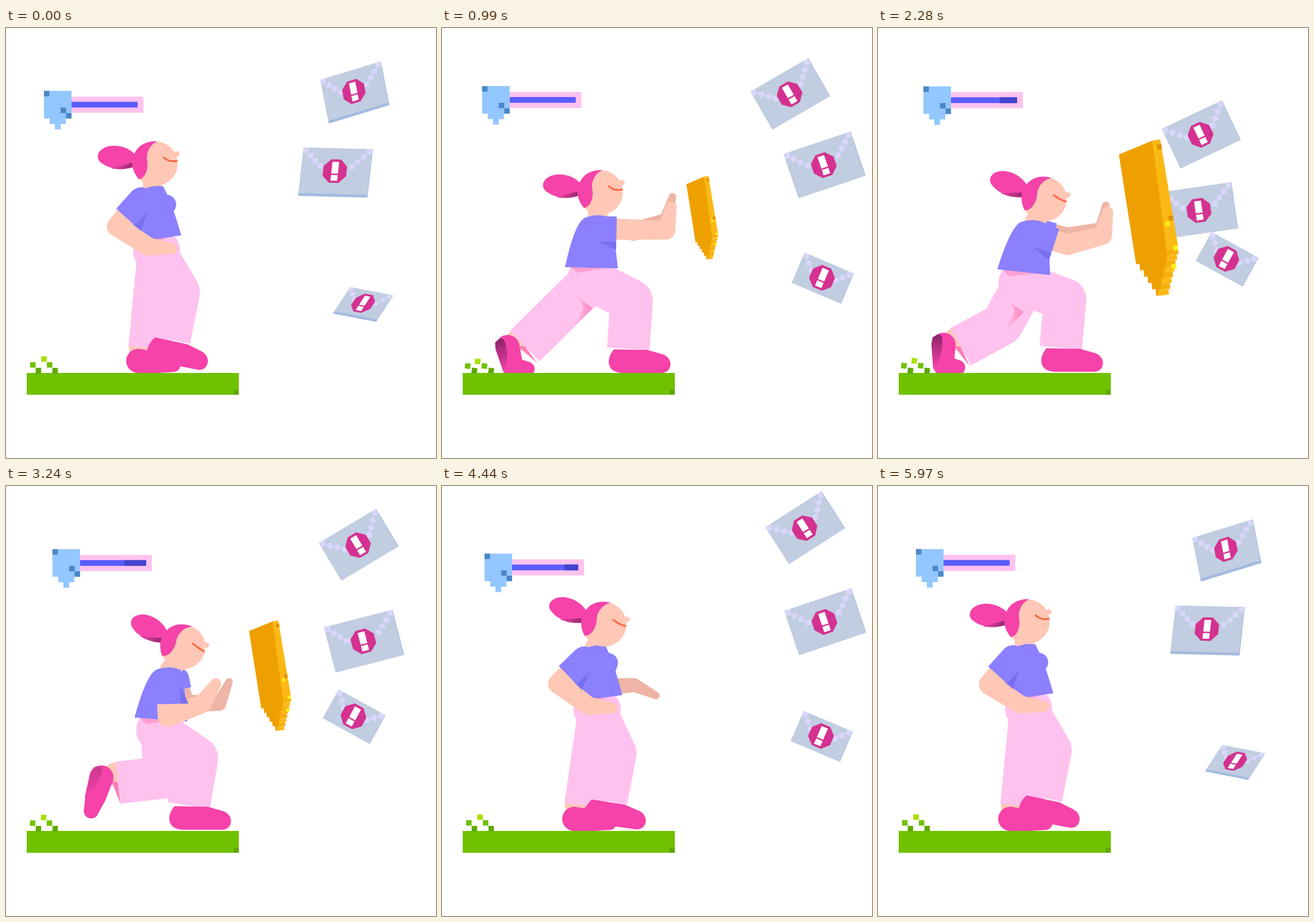
An HTML page that plays this animation: 748 px wide and 748 px high, repeating every 6000 ms.

```html
<!DOCTYPE html>
<html lang="en">
<head>
<meta charset="utf-8">
<title>Shield and mail</title>
<style>
html, body { margin: 0; width: 100%; height: 100%; overflow: hidden; background: #fff; }
svg { display: block; width: 100vw; height: 100vh; }
</style>
</head>
<body>
<svg id="stage" viewBox="0 0 748 748">
  <defs>
    <linearGradient id="tailShade"><stop offset="0" stop-color="#f543a9"/><stop offset="1" stop-color="#962870"/></linearGradient>
    <linearGradient id="soleShade"><stop offset="0" stop-color="#8c2469"/><stop offset="1" stop-color="#f543a9"/></linearGradient>
    <linearGradient id="legShade"><stop offset="0" stop-color="#ffc2ee"/><stop offset="1" stop-color="#ff83bd"/></linearGradient>
  </defs>
</svg>
<script>
const LOOP = 6000;
const SKIN = '#ffc7b5', FAR_SKIN = '#eeb4a5', PINK = '#f543a9', PANTS = '#ffc2ee', SHIRT = '#8b80ff';
const stage = document.getElementById('stage');

/* Drawing helpers */
function el(tag, attrs, parent = stage) {
  const node = document.createElementNS('http://www.w3.org/2000/svg', tag);
  for (const key in attrs) node.setAttribute(key, attrs[key]);
  parent.appendChild(node);
  return node;
}
const group = (parent = stage) => el('g', {}, parent);
const rect = (x, y, width, height, fill, parent) => el('rect', { x, y, width, height, fill }, parent);
const shape = (fill, d = '', parent = stage) => el('path', { fill, d }, parent);
const place = (node, transform) => node.setAttribute('transform', transform);
const draw = (node, d) => node.setAttribute('d', d);
const fade = (node, opacity) => node.setAttribute('opacity', opacity);
const poly = pts => 'M' + pts.join('L') + 'Z';

/* Geometry and easing */
const clamp = v => Math.max(0, Math.min(1, v));
const linear = (t, from, to) => clamp((t - from) / (to - from));
const ramp = (t, from, to) => { const u = linear(t, from, to); return u * u * (3 - 2 * u); };
const bell = (t, peak, spread) => Math.abs(t - peak) < spread ? Math.cos((t - peak) / spread * Math.PI / 2) ** 2 : 0;
const mix = (a, b, u) => a.map((v, i) => v + (b[i] - v) * u);
const polar = ([x, y], degrees, r) => [x + r * Math.cos(degrees * Math.PI / 180), y + r * Math.sin(degrees * Math.PI / 180)];
const offset = ([x, y], [dx, dy]) => [x + dx, y + dy];
function turned([x, y], degrees) {
  const c = Math.cos(degrees * Math.PI / 180), s = Math.sin(degrees * Math.PI / 180);
  return [x * c - y * s, x * s + y * c];
}
function unit(a, b) {
  const d = Math.hypot(b[0] - a[0], b[1] - a[1]) || 1;
  return [(b[0] - a[0]) / d, (b[1] - a[1]) / d, d];
}
// Middle joint of a two-bone chain; side picks the way it bends.
function joint(a, b, first, second, side) {
  const [x, y, d] = unit(a, b), sum = first + second;
  const along = d < sum ? (first ** 2 + d ** 2 - second ** 2) / (2 * d) : d * first / sum;
  const out = side * Math.sqrt(d < sum ? Math.max(0, first ** 2 - along ** 2) : 0);
  return [a[0] + x * along - y * out, a[1] + y * along + x * out];
}
// Rounded, tapered chain of joints.
function limb(joints, radii, flatEnd) {
  let d = '';
  joints.forEach((p, i) => {
    const r = radii[i], q = joints[i + 1];
    if (q || !flatEnd)
      d += `M${p[0] - r},${p[1]}a${r},${r} 0 1 1 ${2 * r},0a${r},${r} 0 1 1 ${-2 * r},0Z`;
    if (!q) return;
    const [x, y] = unit(p, q), s = radii[i + 1];
    d += poly([[p[0] + y * r, p[1] - x * r], [q[0] + y * s, q[1] - x * s],
      [q[0] - y * s, q[1] + x * s], [p[0] - y * r, p[1] + x * r]]);
  });
  return d;
}
// Smooth periodic interpolation that never overshoots its keys.
function track(times, rows) {
  const n = times.length, wrap = k => (k + n) % n;
  const span = k => (times[wrap(k + 1)] - times[wrap(k)] + LOOP) % LOOP;
  const rate = (k, c) => (rows[wrap(k + 1)][c] - rows[wrap(k)][c]) / span(k);
  const slope = (k, c) => {
    const a = rate(k - 1, c), b = rate(k, c);
    return a * b <= 0 ? 0 : 2 * a * b / (a + b);
  };
  return t => {
    const k = times.filter(time => time <= t).length - 1, next = wrap(k + 1);
    const h = span(k), u = (t - times[k]) / h, v = 1 - u;
    return rows[k].map((from, c) => from * v * v * (1 + 2 * u) + rows[next][c] * u * u * (3 - 2 * u)
      + h * u * v * (slope(k, c) * v - slope(next, c) * u));
  };
}

/* Envelopes: each swings between an away and an attack pose, and floats tilted at the loop's ends. */
function envelope({ w, h, steps, peak, spread, away, attack, float }) {
  const body = group();
  const edge = rect(0, 0, w + 1, h, '#a3bade', body);
  rect(0, 0, w, h, '#c1cde0', body);
  for (let i = 0; i < steps; i++)
    for (const x of [i * 9.3, w - 9.5 - i * 9.3]) rect(x, i * 9.2, 9.5, 9.5, '#d9d6fb', body);
  const badge = group(body);
  place(badge, `translate(${w / 2 - 1} ${h / 2})`);
  shape('#d43190', poly(Array.from({ length: 8 }, (_, i) => polar([0, 0], 22.5 + 45 * i, 22.5))), badge);
  const mark = group(badge);
  rect(-6, -16.5, 12, 21, '#fff', mark);
  rect(-6, 7, 12, 10, '#fff', mark);
  const update = t => {
    const lift = ramp(t, 4300, LOOP) + 1 - ramp(t, 0, 900);
    const swing = mix(away, attack, bell(t, peak, spread));
    const [x, y, turn, skew, size] = mix([...swing, 0, 1], float, lift);
    place(body, `translate(${x} ${y}) rotate(${turn}) skewX(${skew}) scale(${size}) translate(${-w / 2} ${-h / 2})`);
    edge.setAttribute('height', h + 5 * lift);
  };
  return { mark, update };
}
const mails = [
  { w: 115, h: 76, steps: 4, peak: 2050, spread: 1800, away: [632, 72, -33], attack: [559, 190, -25], float: [606, 110, -17, -6, .95] },
  { w: 122, h: 81, steps: 4, peak: 2380, spread: 1550, away: [668, 236, -19], attack: [558, 318, -8], float: [573, 249, 1.4, -5, .98] },
  { w: 92, h: 57, steps: 3, peak: 2780, spread: 1800, away: [662, 435, 23], attack: [595, 395, 30], float: [622, 479, 11, -22, .82] }
].map(envelope);

/* Shield */
const shield = group();
const stairs = [];
for (let i = 5; i >= 0; i--) stairs.push([-15 + 7 * i, 80 + 11 * i], [-21 + 7 * i, 81 + 11 * i]);
shape('#eea000', poly([[-51, -110], [7, -134], [38, 60], [32, 95], [17, 136], ...stairs]), shield);
shape('#fcb814', poly([[7, -134], [21, -136], [52, 50], [33, 64]]), shield);
function brick(x, y, width, height, fill) {
  place(rect(0, 0, width, height, fill, shield), `translate(${x} ${y}) rotate(-8)`);
}
for (let i = 0; i < 8; i++) brick(34 - 2.4 * i, 56 + 10.1 * i, 18, 9.5, i % 2 ? '#fcb814' : '#f7ae0c');
for (const [x, y] of [[15, -127], [35, -3]]) brick(x, y, 8, 8.5, '#dd9200');
for (const [x, y] of [[29, 7], [43, 49], [40, 81]]) brick(x, y, 8, 8.5, '#ffee1a');

/* Energy bar */
const bar = group();
rect(48, 10, 125, 28, PANTS, bar);
rect(48, 19, 115, 10, '#5a5cff', bar);
const loss = rect(0, 19, 0, 10, '#4244cc', bar);
const gem = group(bar);
for (const [x, y, w, h] of [[0, 0, 48, 48], [10, 47, 28, 10.5], [19, 57, 10, 10]]) rect(x, y, w, h, '#93c7ff', gem);
for (const at of [0, 29, 38.5]) rect(at, at, 9.5, 9.5, '#4a87c8', gem);

/* Figure layers, back to front */
const farArm = shape(FAR_SKIN), farSleeve = shape(SHIRT);
const ankle = shape(SKIN), lining = shape('#ff7db5');
const backShoe = shape(PINK), sole = shape('url(#soleShade)', 'M-13,19Q-24,2 -8,2Q24,2 42,18L-2,21Z');
const backLeg = shape(PANTS);
const crotch = shape('url(#legShade)', 'M-27,26Q-3,42 -13,61L-27,85L7,51Z');
const frontLeg = shape(PANTS), waist = shape('#ff9fd2');
const frontShoe = shape(PINK, 'M9,0L67,1L92,8C114,14 111,41 92,41H25C-3,41 -6,18 9,0Z');
const neck = shape(SKIN);
const shirt = shape(SHIRT, 'M-19,0Q0,-7 19,0Q29,31 35,89L-57,87Q-39,3 -19,0Z');
const head = group();
const nearArm = shape(SKIN), nearSleeve = shape(SHIRT), fold = shape('#7a6ff0');

shape(PINK, 'M-35,-16C-48,-29 -64,-32 -76,-31C-100,-29 -108,-9 -92,0C-78,11 -56,9 -40,6L-30,-4Z', head);
shape('url(#tailShade)', 'M-78,8C-60,4 -50,1 -41,-2L-39,6C-54,11 -66,10 -78,8Z', head);
el('circle', { r: 38.7, fill: SKIN }, head);
el('circle', { cx: 37, cy: -17, r: 4.8, fill: SKIN }, head);
shape(PINK, 'M3,-39C-17,-40 -32,-30 -37,-16C-44,-2 -40,14 -29,27C-18,26 -11,8 -15,-8C-16,-22 -8,-34 3,-39Z', head);
const smile = el('path', { fill: 'none', stroke: '#ff6340', 'stroke-width': 3, 'stroke-linecap': 'round' }, head);

// Collar and lean; wrists from the collar with hand angle; front hem and heel with foot angle.
const idle = { collar: [255, 279], lean: -10, nod: 0, near: [-8, 101, 5], far: [28, 104, 80], front: [284, 542, 11], heel: [230, 579, 5] };
const push = { ...idle, collar: [271, 329], lean: 0, near: [119, 23, -78], far: [119, 5, -75], front: [324, 558, 0], heel: [114, 555, 75] };
const strain = { ...push, collar: [272, 338], lean: 5, nod: 14, far: [117, 12, -80], front: [318, 556, 0], heel: [114, 551, 90] };
const kneel = { ...strain, collar: [285, 319], lean: 3, nod: 20, near: [57, 60, -57], far: [86, 60, -66], heel: [166, 507, 107] };
const stroll = { ...idle, collar: [272, 288], lean: -4, nod: 20, near: [-15, 101, 7], far: [20, 98, 80], front: [301, 540, 15] };
const point = { ...idle, collar: [261, 278], lean: -11, nod: 3, far: [121, 30, -32], front: [276, 556, 0] };
const posture = track([0, 990, 2280, 3240, 3870, 5040],
  [idle, push, strain, kneel, stroll, point].map(pose => Object.values(pose).flat()));

/* Ground */
rect(36, 600, 369, 38, '#70c100');
rect(396, 629, 9, 9, '#5fa800');
const tufts = [586, 596, 576, 586, 596].map((y, i) => {
  const fill = { 576: '#a8e000', 586: '#70c100', 596: '#5fa800' }[y];
  return { x: 46.7 + 9.7 * i, y, node: rect(-4.75, -4.75, 9.5, 9.5, fill) };
});

function drawArm(skin, sleeve, shoulder, wrist, turn, build) {
  const elbow = joint(shoulder, wrist, build.upper, build.lower, 1);
  const cuff = mix(shoulder, elbow, build.reach);
  draw(skin, limb([shoulder, elbow, wrist, polar(wrist, turn, 42)], build.radii));
  draw(sleeve, limb([shoulder, cuff], [build.cuff, build.cuff], true));
  return cuff;
}
function drawLeg(leg, hip, hem, bone) {
  draw(leg, limb([hip, joint(hip, hem, bone, bone, -1), hem], [37, 37, 37], true));
}

function drawTorso(collar, lean, nod) {
  place(shirt, `translate(${collar}) rotate(${lean})`);
  const [x, y] = offset(collar, [5 + .9 * nod, -43 + .2 * nod]);
  place(head, `translate(${x} ${y}) rotate(${nod})`);
  draw(smile, `M14,-11Q24,${-2 - .28 * nod} 37,-5`);
  draw(neck, limb([[x - 5, y + 22], collar], [17, 17]));
  draw(waist, poly([[-48, 87], [15, 88], [-36, 97]].map(p => offset(collar, turned(p, lean)))));
}
function drawArms(collar, lean, near, nearTurn, far, farTurn) {
  const shoulder = offset(collar, [-8 + 1.2 * lean, 20]);
  const cuff = drawArm(nearArm, nearSleeve, shoulder, offset(collar, near), nearTurn,
    { upper: 62, lower: 64, reach: .65, cuff: 22, radii: [19, 18, 16, 9.5] });
  drawArm(farArm, farSleeve, offset(collar, [18 - .6 * lean, 18 - lean]), offset(collar, far), farTurn,
    { upper: 45, lower: 60, reach: .45, cuff: 17, radii: [14, 16, 12, 6.5] });
  const [x, y] = unit(shoulder, cuff), side = y > x ? 1 : -1;
  const out = [y * side, -x * side];
  const corner = offset(cuff, out.map(v => v * 22));
  draw(fold, poly([corner, offset(corner, [-32 * x, -32 * y]), offset(corner, out.map(v => v * 14))]));
}
function drawLegs(hip, hem, frontTurn, heel, heelTurn) {
  drawLeg(frontLeg, hip, hem, 84);
  place(frontShoe, `translate(${hem}) rotate(${frontTurn}) translate(-34 1)`);

  const backHem = polar(heel, -52 + .65 * heelTurn, 30);
  drawLeg(backLeg, offset(hip, [8, 0]), backHem, 82);
  const ball = polar(heel, heelTurn, 36);
  const planted = linear(ball[1], 542, 572);
  const toe = polar(ball, heelTurn + (8 - heelTurn) * planted, 25);
  draw(backShoe, limb([heel, ball, toe], [21, 18, 13]));
  place(sole, `translate(${heel}) rotate(${heelTurn})`);
  fade(sole, linear(heelTurn, 10, 60) * (.4 + .6 * planted));

  const knee = joint(hip, backHem, 82, 82, -1), [x, y] = unit(knee, backHem);
  draw(ankle, limb([offset(backHem, [-14 * y, 14 * x]).map((v, i) => v + 4 * [x, y][i]), heel], [20, 15]));
  draw(ankle, limb([offset(backHem, [-y * 16, x * 16]), heel], [20, 15]));
  draw(lining, poly([offset(backHem, [y * 37, -x * 37]), backHem, mix(backHem, heel, .4)]));
}

function drawFigure(t) {
  const [cx, cy, lean, nod, nx, ny, nearTurn, fx, fy, farTurn, hemX, hemY, frontTurn, heelX, heelY, heelTurn] = posture(t);
  const collar = [cx, cy], hip = offset(collar, turned([-16, 107], lean));
  drawTorso(collar, lean, nod);
  drawArms(collar, lean, [nx, ny], nearTurn, [fx, fy], farTurn);
  drawLegs(hip, [hemX, hemY], frontTurn, [heelX, heelY], heelTurn);
  place(crotch, `translate(${hip})`);
  fade(crotch, ramp(t, 800, 990) * (1 - ramp(t, 2280, 2700)));
}

function drawShield(t) {
  const strength = 1.3 - .594 * linear(t, 1300, 3240);
  const size = strength * ramp(t, 780, 1260) * (1 - ramp(t, 3240, 3640));
  place(shield, `translate(${432 + 38 * size} 330) scale(${size})`);
}

function drawBar(t) {
  const phase = t / LOOP * 2 * Math.PI;
  place(bar, `translate(${73.5 - 7.5 * Math.cos(phase)} ${108.5 - 9.2 * Math.sin(phase - .1)})`);
  place(gem, `rotate(${-7 * bell(t, 3870, 400)} 24 24)`);
  const lost = 38 * ramp(t, 1500, 2600) * (1 - ramp(t, 3700, 5500));
  loss.setAttribute('x', 163 - lost);
  loss.setAttribute('width', lost);
}

function render(t) {
  mails.forEach(mail => mail.update(t));
  fade(mails[0].mark, 1 - .5 * bell(t, 5040, 120));
  drawShield(t);
  drawBar(t);
  drawFigure(t);
  const sway = ramp(t, 630, 990) * (1 - ramp(t, 1600, 3750));
  for (const { x, y, node } of tufts) {
    const shift = sway * (596 - y) / 5;
    place(node, `translate(${x - shift} ${y + shift}) rotate(${8 * sway})`);
  }
}

const start = performance.now();
function tick() {
  render((performance.now() - start) % LOOP);
  requestAnimationFrame(tick);
}
tick();
</script>
</body>
</html>
```
